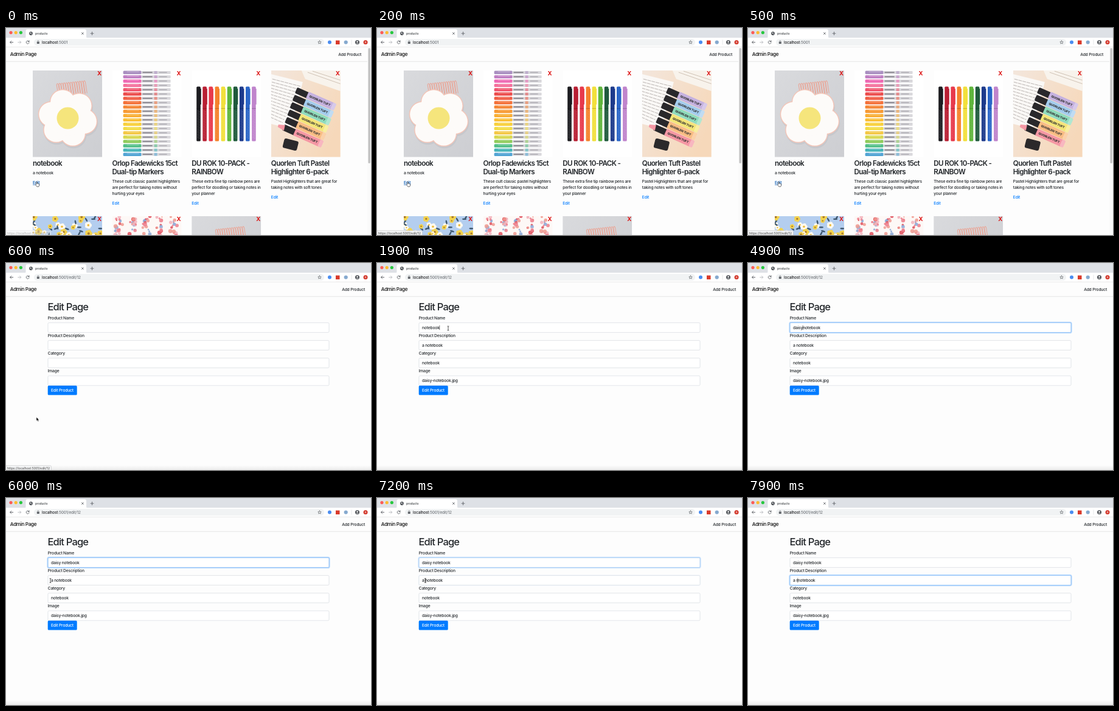
These frames come from a looping animation (600x341 px, 8000 ms). An HTML page:

```html
<!DOCTYPE html>
<html lang="en">
<head>
<meta charset="utf-8">
<title>products</title>
<style>
  html, body { margin: 0; height: 100%; overflow: hidden; background: #fdfdfd; }
  #stage { display: block; width: 100vw; height: 100vh; }
  text { font: 450 6.7px Inter, "Liberation Sans", sans-serif; letter-spacing: -.027em; fill: #212529; white-space: pre; }
  .tab { font-size: 5px; fill: #3c4043; }
  .url { font-size: 6.4px; letter-spacing: -.025em; fill: #202124; }
  .url tspan { fill: #70757a; }
  .brand { font-size: 8.2px; font-weight: 500; letter-spacing: -.045em; fill: #111; }
  .end { text-anchor: end; }
  .h1 { font-size: 16.5px; font-weight: 550; letter-spacing: -.05em; }
  .h3 { font-size: 11.6px; font-weight: 600; letter-spacing: -.052em; }
  .link { fill: #007bff; }
  .hover { fill: #0056b3; text-decoration: underline; }
  .cross { font-size: 9.6px; font-weight: 700; fill: #dc1414; }
  .label { font-size: 5px; font-weight: 800; fill: #333; }
  .status { font-size: 5px; letter-spacing: 0; fill: #555; }
  .field { fill: #fff; stroke: #ced4da; stroke-width: .6; }
  .ring rect { fill: none; stroke: #007bff; stroke-opacity: .27; stroke-width: 1.5; }
  .ring rect + rect { stroke: #80bdff; stroke-opacity: 1; stroke-width: .7; }
  .icon { fill: none; stroke: #5f6368; stroke-width: .9; stroke-linecap: round; stroke-linejoin: round; }

  #list, #edit, #bubble, .ring, #pointer, #arrow, #beam { animation: 8s linear infinite; }
  #list { animation-name: list; animation-timing-function: step-end; }
  #edit { animation-name: edit; animation-timing-function: step-end; }
  #bubble { animation-name: bubble; }
  #ring0 { animation-name: ring0; }
  #ring1 { animation-name: ring1; }
  #pointer { animation-name: travel; animation-timing-function: ease-in-out; }
  #arrow { animation-name: arrow; animation-timing-function: step-end; }
  #beam { animation-name: beam; animation-timing-function: step-end; }
  @keyframes list { 0% { visibility: visible } 7.125%, 100% { visibility: hidden } }
  @keyframes edit { 0% { visibility: hidden } 7.125%, 100% { visibility: visible } }
  @keyframes bubble { 0% { opacity: .4 } 2.5%, 12.5% { opacity: 1 } 14%, 100% { opacity: 0 } }
  @keyframes ring0 { 0%, 24% { opacity: 0 } 25.5%, 89.6% { opacity: 1 } 91%, 100% { opacity: 0 } }
  @keyframes ring1 { 0%, 89.9% { opacity: 0 } 91.6%, 100% { opacity: 1 } }
  @keyframes travel {
    0%, 12.5% { transform: translate(50px, 254px) }
    21.5%, 25.5% { transform: translate(117px, 107.5px) }
    35%, 69.5% { transform: translate(74.5px, 107.5px) }
    74.5%, 77% { transform: translate(73px, 136px) }
    86%, 100% { transform: translate(79.5px, 136px) }
  }
  @keyframes arrow { 0% { visibility: hidden } 7.125% { visibility: visible } 19.8%, 100% { visibility: hidden } }
  @keyframes beam {
    0% { visibility: hidden } 19.8% { visibility: visible } 47.1% { visibility: hidden }
    69.5% { visibility: visible } 97.1%, 100% { visibility: hidden }
  }
</style>
</head>
<body>
<svg id="stage" viewBox="0 0 600 341" preserveAspectRatio="none">
  <defs>
    <linearGradient id="fade" x2="0" y2="1">
      <stop stop-opacity="0"/><stop offset="1" stop-opacity=".07"/>
    </linearGradient>
    <linearGradient id="wall" x2="1" y2="1">
      <stop stop-color="#d9dadd"/><stop offset="1" stop-color="#cdced2"/>
    </linearGradient>
    <linearGradient id="desk" x2="1" y2=".6">
      <stop stop-color="#f3e6dc"/><stop offset="1" stop-color="#f6d8ba"/>
    </linearGradient>
  </defs>

  <rect width="600" height="341" fill="#fdfdfd"/>

  <!-- browser window -->
  <rect width="600" height="17" fill="#dee1e6"/>
  <circle cx="8" cy="7.6" r="2.6" fill="#fc5b57"/>
  <circle cx="16.2" cy="7.6" r="2.6" fill="#fdbc2e"/>
  <circle cx="24.4" cy="7.6" r="2.6" fill="#28c840"/>
  <path d="M29.5 17q3 0 3-3V5q0-3 3-3h93.500q3 0 3 3v9q0 3 3 3z" fill="#fff"/>
  <circle cx="41" cy="9" r="2.9" fill="#4d5156"/>
  <path d="M39.300 8.200l1.700-1 .8 1.200-1.500 1zM41.500 10l1.400-.5-.6 1.500z" fill="#fff"/>
  <text class="tab" x="48" y="10.800">products</text>
  <path class="icon" d="M124.400 7.500l3 3m0-3l-3 3M139 9h5m-2.500-2.500v5"/>
  <rect y="16" width="600" height="15" fill="#fff"/>
  <path d="M0 31.200H600" stroke="#dcdcdc" stroke-width=".6"/>
  <path class="icon" d="M11.700 23.500h-5m2.200-2.300l-2.300 2.300 2.300 2.300"/>
  <path class="icon" d="M19.700 23.500h5m-2.200-2.300l2.300 2.300-2.300 2.300" style="stroke:#b9bcc0"/>
  <path class="icon" d="M37.800 22.200a2.500 2.500 0 1 0 .3 2M38.100 20.800v1.700h-1.800"/>
  <rect x="46" y="18" width="477" height="11" rx="5.500" fill="#f1f3f4"/>
  <rect x="50.800" y="22.700" width="4" height="3.200" rx=".4" fill="#5f6368"/>
  <path class="icon" d="M51.700 22.700v-.8a1.100 1.100 0 0 1 2.200 0v.8" style="stroke-width:.6"/>
  <path class="icon" d="M515.500 20.800l.8 1.800 1.900.2-1.400 1.300.4 1.900-1.700-1-1.700 1 .4-1.900-1.400-1.300 1.900-.2z" style="stroke-width:.7"/>
  <circle cx="532" cy="23.500" r="3" fill="#4b8df0"/>
  <rect x="542" y="20.500" width="6.500" height="6.500" fill="#d93a2b"/>
  <circle cx="558.700" cy="23.500" r="3.100" fill="#86a9cf"/>
  <path d="M568 19.500v8" stroke="#d5d7da" stroke-width=".6"/>
  <circle cx="577.500" cy="23.500" r="3.500" fill="#4d5156"/>
  <circle cx="577.500" cy="22.400" r="1.200" fill="#fff"/>
  <path d="M575.300 25.500a2.400 1.500 0 0 1 4.400 0z" fill="#fff"/>
  <circle cx="591" cy="23.500" r="3.500" fill="#d33b2f"/>
  <path d="M591 21.700v2.600m-1.100-1l1.100 1.100 1.100-1.100" fill="none" stroke="#fff" stroke-width=".7"/>

  <!-- site header -->
  <path d="M0 55.200H600" stroke="#d9dadb" stroke-width=".7"/>
  <text class="brand" x="6.800" y="46">Admin Page</text>

  <g id="list"></g>
  <g id="edit"></g>

  <g id="bubble">
    <path d="M-1 342v-8.300h73.500q2 0 2 2V342z" fill="#f3f4f5" stroke="#c4c6c8" stroke-width=".6"/>
    <text class="status" x="2" y="339.800">https://localhost:5001/edit/12</text>
  </g>

  <g id="pointer">
    <path id="arrow" d="M0 0v6l1.400-1.200 1 2.300 1.200-.5-1-2.200h1.800z" fill="#000" stroke="#fff" stroke-width=".4"/>
    <path id="beam" d="M-1.400-3.500q1.400 0 1.400.9 0-.9 1.400-.9M0-2.800v5.800M-1.400 3.700q1.400 0 1.400-.9 0 .9 1.400.9" fill="none" stroke="#111" stroke-width=".7"/>
  </g>
</svg>

<script>
const $ = id => document.getElementById(id);
const range = (n, make) => Array.from({ length: n }, (_, i) => make(i)).join('');
const text = (x, y, content, kind = '') => `<text x="${x}" y="${y}" class="${kind}">${content}</text>`;
const rect = (x, y, w, h, fill, more = '') =>
  `<rect x="${x}" y="${y}" width="${w}" height="${h}" fill="${fill}" ${more}/>`;
const dot = (x, y, r, fill, more = '') => `<circle cx="${x}" cy="${y}" r="${r}" fill="${fill}" ${more}/>`;

function seeded(seed) {
  return () => (seed = seed * 16807 % 2147483647) / 2147483647;
}

// Product pictures, each in a 114 x 142 box
function flowerBook() {
  const petals = (r, fill) => range(6, i => {
    const a = i * Math.PI / 3 + .22;
    return dot(57.5 + 28 * Math.cos(a), 78 + 27 * Math.sin(a), r, fill);
  });
  const coils = range(13, i =>
    `<path d="M${41 + i * 3.7} 40l-1-19q1.500-4 3 0l1 19" fill="none" stroke="#e9a799" stroke-width="1.100"/>`);
  return rect(0, 0, 114, 143, 'url(#wall)') +
    `<g transform="translate(1 3)" opacity=".4">${petals(21.5, '#b9babf')}</g>` +
    `<g transform="rotate(-6 65 30)">${coils}</g>` +
    petals(21.5, '#f2c5b8') + petals(20, '#fdfbf9') + dot(57.5, 78, 30, '#fdfbf9') + dot(57.5, 78.5, 18, '#f5e57c');
}

function markers() {
  const tones = ('#a98fc0 #c07fc4 #ee6ab4 #f4709c #f0566e #ec4c4c #f05c44 #f47038 #f58634 #f79a34 ' +
    '#f9ae34 #fac038 #f8d03c #f2dc46 #f4c846 #d8d850 #8ecb5a #52bf88 #46b4b8 #52a4d4').split(' ');
  return rect(0, 0, 114, 143, '#fff') + tones.map((tone, i) => {
    const y = 0.6 + i * 7.1;
    return rect(18, y, 30, 5.4, tone, 'rx="1.500"') + rect(24, y + 1, 20, 1, '#fff', 'opacity=".35"') +
      rect(48, y + .3, 48, 4.8, '#d9d8dc', 'rx="1"') + rect(50, y + 1.7, 16, 1.8, '#86838c') +
      rect(69, y + .3, 5, 4.8, tone, 'opacity=".55"') + rect(77, y + 2, 13, 1.2, '#a5a3aa');
  }).join('');
}

function pens() {
  const tones = '#1c1c20 #b81f33 #e83a4c #f5822c #f2e03c #5fb53c #1f5a3c #1d3a8c #2b66c8 #c084cc'.split(' ');
  return rect(0, 0, 114, 143, '#fff') + tones.map((tone, i) => {
    const x = 8 + i * 10.1;
    return rect(x, 26.5, 6.6, 90, tone, 'rx="1.600"') + rect(x + 5.6, 30, 1.9, 26, tone) +
      rect(x, 62, 6.6, .7, '#000', 'opacity=".3"') +
      `<path d="M${x + 2.2} 66v46m2.300-45v46" stroke="#fff" stroke-width=".9" stroke-dasharray=".9 1.700" opacity=".4"/>`;
  }).join('');
}

function highlighters() {
  const tones = '#c6b2e0 #a4cdee #8fdcbd #f4e678 #f9bd84 #f597a4'.split(' ');
  const bars = tones.map((tone, i) =>
    `<g transform="translate(${43 - i * 4.2} ${33 + i * 12.2}) rotate(24)">` +
      rect(-2, -5, 23, 10.5, '#29282b', 'rx="2"') + rect(18, -6, 50, 12, tone, 'rx="2"') +
      rect(62, -6, 6, 12, '#fff', 'rx="2" opacity=".3"') +
      text(22, 1.9, 'QUORLEN TUFT', 'label') + '</g>').join('');
  const lines = range(13, i => `<path d="M${2 - i * .8} ${14 + i * 5}l${46 - i * 1.6} 12" stroke="#a9a3a0" stroke-width=".8" stroke-dasharray="6 1"/>`);
  return rect(0, 0, 114, 143, 'url(#desk)') +
    '<path d="M0 6L52 19 32 96 0 88z" fill="#faf8f6"/>' + lines +
    '<path d="M50 0H114V34L56 14z" fill="#f8f3ec"/>' +
    '<path d="M60 3l54 19M68 1l46 15" stroke="#c5b5a6" stroke-width=".8"/>' +
    bars + '<path d="M23 90l-11-1-1 4 10 6z" fill="#f597a4"/>' +
    '<g transform="translate(32 122) rotate(14)">' + rect(-12, -8, 24, 16, '#2b292b', 'rx="3"') + '</g>';
}

function blueFloral() {
  const rnd = seeded(71);
  return rect(0, 0, 114, 143, '#b4ceef') + range(48, i => {
    const x = (i * 37 + rnd() * 14) % 114, y = rnd() * 38, r = 2.5 + rnd() * 2.8;
    if (i % 2) return `<ellipse cx="${x}" cy="${y}" rx="3.600" ry="1.300" fill="#3f5870" transform="rotate(${i * 40} ${x} ${y})"/>`;
    const yellow = i % 4;
    return range(5, n => dot(x + r * .6 * Math.cos(n * 1.257), y + r * .6 * Math.sin(n * 1.257), r * .6, yellow ? '#f3d34f' : '#fffaf0')) +
      dot(x, y, r * .38, yellow ? '#a87a2c' : '#eebc3c');
  });
}

function garlands() {
  const rnd = seeded(29);
  const tones = ['#ee7f8c', '#f3b3bd', '#e0505c', '#f09a90', '#8aa8d8'];
  return rect(0, 0, 114, 143, '#fdf8f6') + range(110, i =>
    dot(11 + i % 5 * 22.5 + (rnd() - .5) * 12, rnd() * 38, 1 + rnd() * 2.4, tones[Math.floor(rnd() * 5)], 'opacity=".85"'));
}

// Product list
const products = [
  [flowerBook, ['notebook'], ['a notebook']],
  [markers, ['Orlop Fadewicks 15ct', 'Dual-tip Markers'],
    ['These cult classic pastel highlighters', 'are perfect for taking notes without', 'hurting your eyes']],
  [pens, ['DU ROK 10-PACK -', 'RAINBOW'],
    ['These extra fine tip rainbow pens are', 'perfect for doodling or taking notes in', 'your planner']],
  [highlighters, ['Quorlen Tuft Pastel', 'Highlighter 6-pack'],
    ['Pastel Highlighters that are great for', 'taking notes with soft tones']],
  [blueFloral], [garlands], [flowerBook]
];

function card([picture, title = [], about = []], i) {
  const x = 44 + i % 4 * 130.6, y = i < 4 ? 70 : 310;
  const aboutY = 227 + title.length * 14;
  return `<svg x="${x}" y="${y}" width="114" height="142.500">${picture()}</svg>` +
    text(x + 106, y + 8.4, 'X', 'cross') +
    title.map((line, n) => text(x, 227 + n * 14, line, 'h3')).join('') +
    about.map((line, n) => text(x, aboutY + n * 10.1, line)).join('') +
    (title.length ? text(x, aboutY + about.length * 10.1 + 5.8, 'Edit', i ? 'link' : 'link hover') : '');
}

const hand = `<path transform="translate(48.500 253)" fill="#fff" stroke="#111" stroke-width=".6" stroke-linejoin="round"
  d="M1.500 4V.7q.6-.8 1.200 0v2.500q.8-.5 1.200.2.800-.4 1.200.3.900-.2 1 .6v2L5.300 8.300H2.200L.1 5.400q0-1 .9-.6z"/>`;
$('list').innerHTML =
  text(59, 25.8, 'localhost<tspan>:5001</tspan>', 'url') + text(584, 45.5, 'Add Product', 'end') +
  products.map(card).join('') +
  rect(594, 31.5, 6, 310, '#fafafa') + rect(595.4, 33, 3.4, 190, '#c1c1c1', 'rx="1.700"') + hand;

// Edit form
const labels = ['Product Name', 'Product Description', 'Category', 'Image'];
const fieldTop = i => 98.4 + i * 29.15;
const box = (i, grow, kind = '') =>
  `<rect class="${kind}" x="${69 - grow}" y="${fieldTop(i) - grow}" width="${462 + 2 * grow}" height="${16 + 2 * grow}" rx="${1.700 + grow}"/>`;

$('edit').innerHTML =
  text(59, 25.8, 'localhost<tspan>:5001/edit/12</tspan>', 'url') + text(590, 45.5, 'Add Product', 'end') +
  text(68.5, 78, 'Edit Page', 'h1') +
  labels.map((label, i) => text(68.7, fieldTop(i) - 5.5, label) + box(i, 0, 'field')).join('') +
  [0, 1].map(i => `<g class="ring" id="ring${i}">${box(i, .9)}${box(i, 0)}</g>`).join('') +
  labels.map((_, i) => `<text id="value${i}" x="74" y="${fieldTop(i) + 10.6}"></text>`).join('') +
  rect(68.7, 202, 48, 15.6, '#007bff', 'rx="1.700"') +
  '<text x="74" y="212.300" style="fill:#fff">Edit Product</text>' +
  rect(0, 333, 600, 8, 'url(#fade)') +
  '<path id="caret" d="M0-6.400V1.300" stroke="#222" stroke-width=".6"/>';

// Clicks and key presses: time, field, caret position, typed so far
const loop = 8000, filled = 670;
const events = [
  [1870, 0, 8, ''], [2970, 0, 0, ''],
  [3770, 0, 1, 'd'], [4070, 0, 2, 'da'], [4370, 0, 3, 'dai'],
  [4570, 0, 4, 'dais'], [4770, 0, 5, 'daisy'], [5070, 0, 6, 'daisy '],
  [7170, 1, 2, ''], [7770, 1, 3, 'r']
];
const values = labels.map((_, i) => $('value' + i));
const caret = $('caret');

function draw(now) {
  const t = now % loop;
  const past = events.filter(e => e[0] <= t);
  const typed = field => past.filter(e => e[1] == field).pop()?.[3] ?? '';
  const contents = [typed(0) + 'notebook', 'a ' + typed(1) + 'notebook', 'notebook', 'daisy-notebook.jpg'];
  values.forEach((value, i) => {
    const content = t < filled ? '' : contents[i];
    if (value.textContent != content) value.textContent = content;
  });

  const last = past.pop();
  const lit = last && (t - last[0]) % 1000 < 500;
  caret.style.opacity = lit ? 1 : 0;
  if (lit) {
    const [, field, pos] = last;
    const offset = pos ? values[field].getSubStringLength(0, pos) : 0;
    caret.setAttribute('transform', `translate(${74.1 + offset} ${fieldTop(field) + 10.6})`);
  }
}

function tick() {
  draw(performance.now());
  requestAnimationFrame(tick);
}
tick();
</script>
</body>
</html>
```
